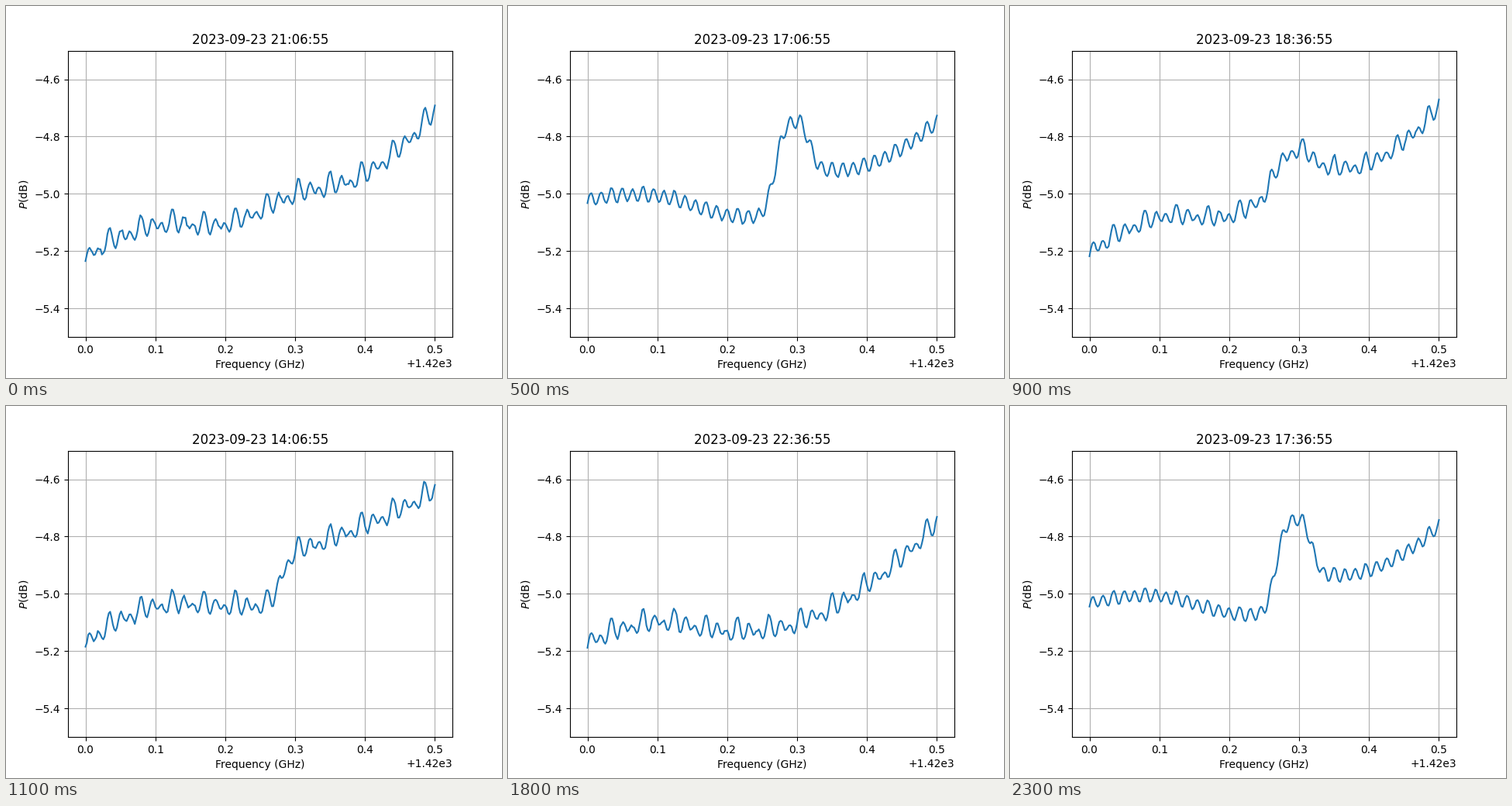
A matplotlib script that plays this animation: 640 by 480 pixels, repeating every 2.4 s.

```python
import numpy as np
import matplotlib.pyplot as plt
from matplotlib.animation import FuncAnimation

POINTS = 256
X = np.linspace(0, 0.5, POINTS)

# Half-hour slots after 12:36:55, in playing order
ORDER = [17, 2, 6, 19, 9, 0, 7, 15, 12, 8, 3, 16,
         13, 21, 14, 5, 18, 20, 11, 1, 22, 4, 10]

# Slot: continuum in dB at 0, 0.1 ... 0.5, then step, hump, ripple, roughness
KEYS = {
    3: [-5.170, -5.042, -5.040, -5.034, -4.948, -4.829, 0.190, 0, 0.0235, 1],
    6: [-5.210, -5.061, -5.007, -4.983, -4.961, -4.845, 0.257, 0.040, 0.0235, 1],
    7: [-4.999, -5.004, -5.088, -5.091, -5.064, -4.918, 0.203, 0.138, 0.0280, 0.1],
    10: [-5.034, -5.007, -5.067, -5.080, -5.067, -4.912, 0.149, 0.203, 0.0220, 0.2],
    13: [-5.286, -5.120, -5.080, -4.900, -4.880, -4.660, 0, 0, 0.0235, 1],
    17: [-5.218, -5.107, -5.105, -5.000, -4.929, -4.709, 0, 0, 0.0235, 1],
    20: [-5.168, -5.096, -5.129, -5.100, -4.969, -4.750, 0, 0, 0.0235, 1],
}


def sigmoid(x):
    return 1 / (1 + np.exp(-x))


def smooth(levels):
    """Cubic Hermite curve through equally spaced levels."""
    pos = X / X[-1] * (len(levels) - 1)
    i = np.minimum(pos.astype(int), len(levels) - 2)
    t = pos - i
    slope = np.gradient(levels, edge_order=2)
    ease = t * t * (3 - 2 * t)
    return (levels[i] + (levels[i + 1] - levels[i]) * ease
            + t * (1 - t) ** 2 * slope[i] - t * t * (1 - t) * slope[i + 1])


def spectrum(slot):
    columns = zip(*KEYS.values())
    params = np.array([np.interp(slot, list(KEYS), c) for c in columns])
    step, hump, ripple, rough = params[6:]

    # The line's edge drifts to lower frequency through the day
    edge = sigmoid((X - 0.280 + 0.0019 * (slot - 3)) / 0.007)
    line_gain = edge * (step + hump * sigmoid((0.318 - X) / 0.006))

    # Standing waves: one ripple and two slower beats
    phase = 2 * np.pi * (X - 0.0345) / 0.0451
    waves = (ripple * np.cos(3 * phase)
             + rough * (0.019 * np.cos(2 * phase + 0.38)
                        + 0.009 * np.cos(phase - 0.62)))

    noise = np.random.default_rng(slot).normal(size=POINTS)
    return (smooth(params[:6]) + line_gain + waves
            + noise * (0.0012 + 0.0012 * rough))


def stamp(slot):
    minutes = 12 * 60 + 36 + 30 * slot
    return f"2023-09-23 {minutes // 60:02d}:{minutes % 60:02d}:55"


fig, ax = plt.subplots(figsize=(6.4, 4.8), dpi=100)
line, = ax.plot(1420 + X, spectrum(ORDER[0]))
title = ax.set_title(stamp(ORDER[0]))
ax.set_ylim(-5.5, -4.5)
ax.set_xlabel("Frequency (GHz)")
ax.set_ylabel("$P$(dB)")
ax.grid(True)


def update(frame):
    slot = ORDER[max(frame - 1, 0)]  # the first view is held twice as long
    line.set_ydata(spectrum(slot))
    title.set_text(stamp(slot))
    return line, title


anim = FuncAnimation(fig, update, frames=len(ORDER) + 1, interval=100,
                     repeat=True, repeat_delay=0)
plt.show()
```
